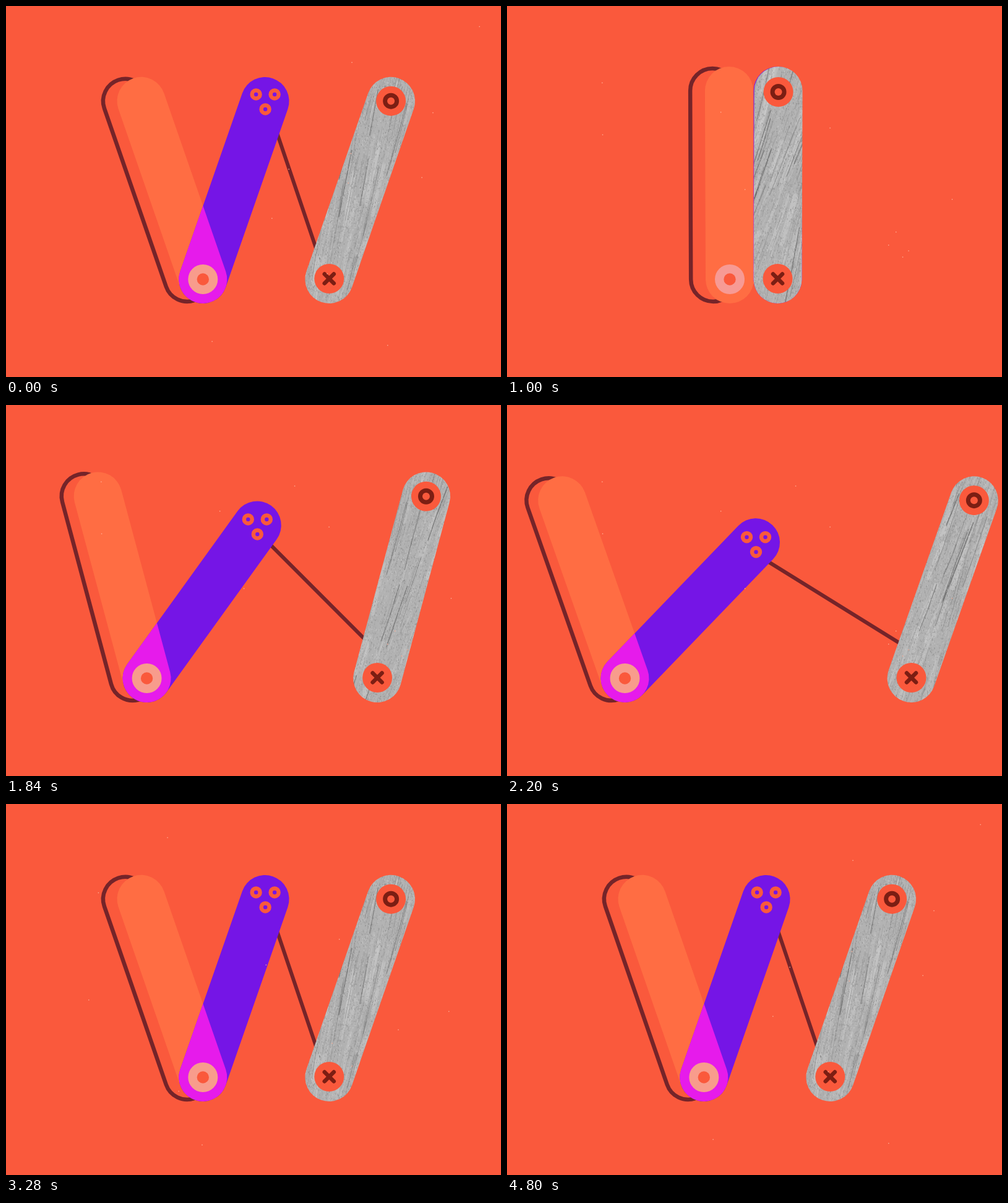
An HTML page with a canvas that plays this animation: 800x600 px, repeating every 4840 ms.

```html
<!DOCTYPE html>
<html lang="en">
<head>
<meta charset="utf-8">
<title>Hinged W</title>
<style>
html, body { margin: 0; width: 100%; height: 100%; overflow: hidden; background: #fa593c; }
canvas { display: block; }
</style>
</head>
<body>
<canvas id="stage" width="800" height="600"></canvas>
<script>
const ctx = document.getElementById('stage').getContext('2d');
const LOOP = 4840, LENGTH = 305, FLOOR = 442, RADIUS = 39;
const BG = '#fa593c', DARK = '#752429', MARK = '#7c1e13', PURPLE = '#7515e6';

// Key poses; angles in degrees
const rest = { x: 318.3, gap: 204, lean: 19.1, hinge: 19.2, rod: 18.7 };
const closed = { x: 360, gap: 77.5, lean: 0.2, hinge: 0, rod: 0 };
const opening = { x: 290.5, gap: 224, lean: 7.7, hinge: 20.9, rod: 22.9 };
const stretched = { x: 190.5, gap: 463, lean: 19.4, hinge: 43.9, rod: 58.2 };
const squeezed = { x: 343, gap: 152.5, lean: 0, hinge: 15.5, rod: 10.1 };
const CLOSED_AT = 1000;
const KEYS = [
  [0, rest], [450, rest], [CLOSED_AT, closed], [1480, opening],
  [2200, stretched], [2600, squeezed], [3160, rest], [LOOP, rest]
];

function seeded(seed) {
  return (min, max) => {
    seed = (seed * 16807) % 2147483647;
    return min + (max - min) * seed / 2147483647;
  };
}

// Weathered wood, fixed to the stage and seen through the grey bar
function makeWood() {
  const random = seeded(4711);
  const wood = document.createElement('canvas');
  wood.width = 800;
  wood.height = 600;
  const w = wood.getContext('2d');
  w.fillStyle = '#b2b2b2';
  w.fillRect(0, 0, 800, 600);
  w.lineCap = 'round';
  function grain(count, dark, light, alpha, width, length) {
    for (let i = 0; i < count; i++) {
      const x = random(360, 800), y = random(80, 500);
      const lean = 0.28 + 0.1 * Math.sin(x / 40 + y / 90) + random(-0.04, 0.04);
      const size = random(length / 3, length), level = random(dark, light);
      w.strokeStyle = `rgba(${level},${level},${level},${alpha})`;
      w.lineWidth = random(width / 3, width);
      w.beginPath();
      w.moveTo(x, y);
      w.quadraticCurveTo(x + size * lean / 2 + random(-2, 2), y - size / 2, x + size * lean, y - size);
      w.stroke();
    }
  }
  grain(220, 160, 220, 0.4, 9, 110);
  grain(1500, 120, 215, 0.3, 2, 50);
  grain(90, 80, 115, 0.6, 1.8, 130);
  for (let i = 0; i < 24000; i++) {
    const level = random(100, 230);
    w.fillStyle = `rgba(${level},${level},${level},.4)`;
    w.fillRect(random(360, 800), random(80, 500), 1, random(1, 3));
  }
  return wood;
}
const WOOD = ctx.createPattern(makeWood(), 'no-repeat');

// Monotone cubic through the keys: still at turning points, smooth in passing
function poseAt(t) {
  let i = 0;
  while (i < KEYS.length - 2 && t >= KEYS[i + 1][0]) i++;
  const slope = (k, name) => KEYS[k] && KEYS[k + 1]
    ? (KEYS[k + 1][1][name] - KEYS[k][1][name]) / (KEYS[k + 1][0] - KEYS[k][0]) : 0;
  const tangent = (k, name) => {
    const a = slope(k - 1, name), b = slope(k, name);
    return a * b > 0 ? 2 * a * b / (a + b) : 0;
  };
  const [start, from] = KEYS[i], [end, to] = KEYS[i + 1];
  const span = end - start, u = (t - start) / span;
  const pose = {};
  for (const name in rest) {
    pose[name] = from[name] + (to[name] - from[name]) * smooth(u)
      + span * u * (1 - u) * ((1 - u) * tangent(i, name) - u * tangent(i + 1, name));
  }
  return pose;
}

const rad = degrees => degrees * Math.PI / 180;
const smooth = u => u * u * (3 - 2 * u);
const clamp = u => Math.min(1, Math.max(0, u));

function tip(x, angle, length = LENGTH) {
  return [x + length * Math.sin(angle), FLOOR - length * Math.cos(angle)];
}

function bar(x, angle, radius = RADIUS) {
  const path = new Path2D();
  path.arc(...tip(x, angle), radius, Math.PI + angle, 2 * Math.PI + angle);
  path.arc(x, FLOOR, radius, angle, Math.PI + angle);
  path.closePath();
  return path;
}

function fill(path, color) {
  ctx.fillStyle = color;
  ctx.fill(path);
}

function disc(x, y, radius, color) {
  ctx.fillStyle = color;
  ctx.beginPath();
  ctx.arc(x, y, radius, 0, 2 * Math.PI);
  ctx.fill();
}

function line(x1, y1, x2, y2, width, color) {
  ctx.strokeStyle = color;
  ctx.lineWidth = width;
  ctx.beginPath();
  ctx.moveTo(x1, y1);
  ctx.lineTo(x2, y2);
  ctx.stroke();
}

// Six sets of dust in turn, fifteen a second
function drawDust(t) {
  const random = seeded(1000 + 7919 * (Math.floor(t * 15 / 1000) % 6));
  random();
  ctx.fillStyle = '#ffae96';
  for (let i = 0; i < 11; i++) ctx.fillRect(random(1, 797), random(8, 561), 1.4, 1.4);
}

function draw(t) {
  const { x, gap, lean, hinge, rod } = poseAt(t);
  const tilt = rad(lean), greyX = x + gap;

  // The purple bar tucks in behind the grey one when the letter closes
  const tuck = smooth(clamp((160 - Math.abs(t - CLOSED_AT)) / 130));
  const purpleX = x + gap * tuck;
  const [px, py] = tip(purpleX, rad(hinge));
  const orange = bar(x, -tilt), purple = bar(purpleX, rad(hinge));

  ctx.fillStyle = BG;
  ctx.fillRect(0, 0, 800, 600);
  ctx.lineCap = 'round';

  ctx.strokeStyle = DARK;
  ctx.lineWidth = 6.5;
  ctx.stroke(bar(x - 16 - 0.03 * x, -tilt, RADIUS - 3));
  fill(orange, '#ff6d43');

  // The rod slips down from its joint as it swings out
  const drop = Math.max(0, rod - 25) * 0.6;
  const rodX = px + 2, rodY = py + drop;
  line(rodX, rodY, rodX + LENGTH * Math.sin(rad(rod)), rodY + LENGTH * Math.cos(rad(rod)), 6, DARK);

  fill(purple, PURPLE);
  ctx.save();
  ctx.clip(orange);
  fill(purple, '#e61beb');
  ctx.restore();
  for (const [dx, dy] of [[-14.5, -11], [15.5, -11], [0.5, 13]]) {
    disc(px + dx, py + dy + drop / 8, 9.7, BG);
    disc(px + dx, py + dy + drop / 8, 3.2, PURPLE);
  }
  disc(x, FLOOR, 24, tuck > 0.5 ? '#f79a94' : '#f89c8c');
  disc(x, FLOOR, 9.7, BG);

  fill(bar(greyX, tilt), WOOD);
  const [topX, topY] = tip(greyX, tilt, LENGTH - 2 + lean / 9);
  disc(topX, topY, 24, BG);
  disc(topX, topY, 13, MARK);
  disc(topX, topY, 6, BG);
  const footY = FLOOR - 1;
  disc(greyX, footY, 24, BG);
  for (const side of [-7.5, 7.5]) line(greyX - side, footY - 7.5, greyX + side, footY + 7.5, 6.5, MARK);

  drawDust(t);
}

function tick() {
  draw(performance.now() % LOOP);
  requestAnimationFrame(tick);
}
tick();
</script>
</body>
</html>
```
